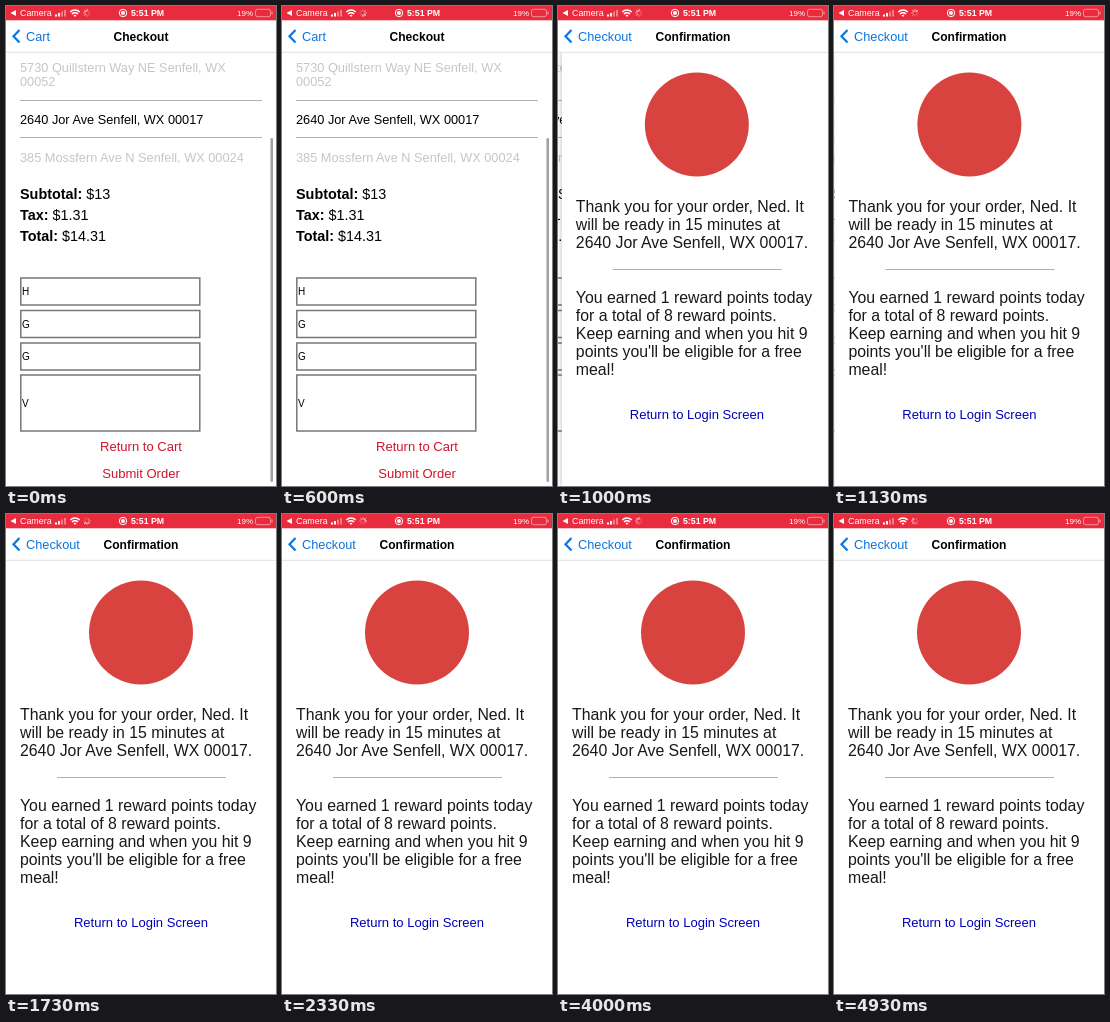
An HTML page for the animation above (4.99 s loop, 270x480 px).

```html
<!DOCTYPE html>
<html lang="en">
<head>
<meta charset="utf-8">
<title>Checkout</title>
<style>
  html, body { margin: 0; width: 100%; height: 100%; overflow: hidden; background: #fff; }
  svg { display: block; width: 100vw; height: 100vh; }
  text { font-family: "Liberation Sans", Arial, sans-serif; white-space: pre; }
  .status text { font-size: 8.9px; fill: #fff; }
  .status .clock { font-size: 8.75px; font-weight: bold; }
  .status .charge { font-size: 8px; }
  .back { font-size: 12.75px; fill: #0b74e0; }
  .title { font-size: 12.06px; font-weight: bold; text-anchor: middle; }
  .pick { font-size: 12.75px; }
  .faint { fill: #c6c6c6; }
  .sum { font-size: 14.4px; }
  .sum tspan { font-weight: bold; }
  .field { font-size: 10px; }
  .box { fill: #fff; stroke: #777; stroke-width: 1.5; }
  .rule { stroke: #b0b0b0; }
  .button { font-size: 13.05px; text-anchor: middle; }
  .body { font-size: 15.85px; fill: #181818; }
</style>
</head>
<body>
<svg viewBox="0 0 270 480">
  <defs>
    <filter id="blur" x="-20" width="41"><feGaussianBlur stdDeviation="2.5"/></filter>
  </defs>
  <rect width="270" height="480" fill="#fff"/>

  <g id="checkout">
    <text class="pick faint" x="14" y="66">5730 Quillstern Way NE Senfell, WX</text>
    <text class="pick faint" x="14" y="80.3">00052</text>
    <path class="rule" d="M14 94.5H256M14 131.5H256"/>
    <text class="pick" x="14" y="118">2640 Jor Ave Senfell, WX 00017</text>
    <text class="pick faint" x="14" y="155.5">385 Mossfern Ave N Senfell, WX 00024</text>
    <text class="sum" x="14" y="193"><tspan>Subtotal:</tspan> $13</text>
    <text class="sum" x="14" y="214"><tspan>Tax:</tspan> $1.31</text>
    <text class="sum" x="14" y="235"><tspan>Total:</tspan> $14.31</text>
    <g id="fields"></g>
    <text class="button" x="135" y="444.5" fill="#d0142c">Return to Cart</text>
    <text class="button" x="135" y="471.5" fill="#d0142c">Submit Order</text>
    <rect x="264.5" y="132" width="2.5" height="344" rx="1.2" fill="#a0a0a0"/>
  </g>

  <g id="confirmation">
    <rect y="46" width="6" height="434" fill="#000" opacity=".3" filter="url(#blur)"/>
    <rect y="46" width="270" height="434" fill="#fff"/>
    <circle cx="135" cy="118.500" r="52" fill="#d9433f"/>
    <g id="message"></g>
    <path class="rule" d="M51 263.500H220"/>
    <text class="button" x="135" y="413" fill="#0000b8">Return to Login Screen</text>
  </g>

  <rect width="270" height="46" fill="#fff"/>
  <path d="M0 46.300H270" stroke="#c9c9cc" stroke-width=".6"/>
  <path d="M13.500 24L7.500 30.200L13.500 36.400" fill="none" stroke="#0b74e0" stroke-width="2.200"/>
  <g id="oldHeader">
    <text class="back" x="20" y="34.500">Cart</text>
    <text class="title" x="135" y="34.500">Checkout</text>
  </g>
  <g id="newHeader">
    <text class="back" x="20" y="34.500">Checkout</text>
    <text class="title" x="135" y="34.500">Confirmation</text>
  </g>

  <g class="status">
    <rect width="270" height="14.300" fill="#e92c3d"/>
    <path d="M10 4V10L4.500 7Z" fill="#fff"/>
    <text x="14" y="10.200">Camera</text>
    <path d="M49 8.500h2v2h-2zM52 7h2v3.500h-2z" fill="#fff"/>
    <path d="M55 5.500h2v5h-2zM58 4h2v6.500h-2z" fill="#fff" opacity=".4"/>
    <g fill="none" stroke="#fff" stroke-width="1.500">
      <path d="M64.300 6A6.600 6.600 0 0 1 73.700 6M66 8A4.200 4.200 0 0 1 72 8"/>
      <circle cx="117" cy="7" r="3.700" stroke-width="1"/>
    </g>
    <path d="M67.500 9.300Q69 8.200 70.500 9.300L69 11Z" fill="#fff"/>
    <circle cx="117" cy="7" r="2" fill="#fff"/>
    <g id="spinner" stroke="#fff" stroke-width="1" stroke-linecap="round"></g>
    <text class="clock" x="125" y="10.200">5:51 PM</text>
    <text class="charge" x="231" y="10">19%</text>
    <rect x="249.500" y="3.300" width="15" height="7.400" rx="2" fill="none" stroke="#fff" stroke-width=".8" opacity=".6"/>
    <path d="M266 5.700v2.600" stroke="#fff" opacity=".6"/>
  </g>
</svg>

<script>
const LOOP = 4990, PUSH_START = 677, PUSH_TIME = 500, SPOKES = 8;
const byId = id => document.getElementById(id);

byId("fields").innerHTML = [["H", 272, 27], ["G", 304.5, 27], ["G", 337, 27], ["V", 369, 56]]
  .map(([label, y, h]) =>
    `<rect class="box" x="14.8" y="${y}" width="179" height="${h}"/>
     <text class="field" x="16" y="${y + h / 2 + 3.6}">${label}</text>`)
  .join("");

const paragraph = (top, lines) => lines
  .map((line, i) => `<text class="body" x="14" y="${top + i * 18.1}">${line}</text>`)
  .join("");
byId("message").innerHTML =
  paragraph(206, [
    "Thank you for your order, Ned. It",
    "will be ready in 15 minutes at",
    "2640 Jor Ave Senfell, WX 00017."
  ]) +
  paragraph(297, [
    "You earned 1 reward points today",
    "for a total of 8 reward points.",
    "Keep earning and when you hit 9",
    "points you'll be eligible for a free",
    "meal!"
  ]);

byId("spinner").innerHTML = Array.from({ length: SPOKES }, (_, i) =>
  `<path d="M81 5.2V3.6" transform="rotate(${i * 360 / SPOKES} 81 7)"/>`).join("");
const spokes = [...byId("spinner").children];

function bezierEase(x1, y1, x2, y2) {
  const curve = (a, b, s) => 3 * a * s * (1 - s) ** 2 + 3 * b * s * s * (1 - s) + s ** 3;
  return x => {
    let low = 0, high = 1;
    for (let i = 0; i < 24; i++) {
      const mid = (low + high) / 2;
      if (curve(x1, x2, mid) < x) low = mid; else high = mid;
    }
    return curve(y1, y2, low);
  };
}
const ease = bezierEase(0.2833, 0.99, 0.31833, 0.99);

function draw(t) {
  const linear = Math.min(1, Math.max(0, (t - PUSH_START) / PUSH_TIME));
  const push = linear === 0 || linear === 1 ? linear : ease(linear);
  byId("checkout").setAttribute("transform", `translate(${-81 * push})`);
  byId("confirmation").setAttribute("transform", `translate(${270 * (1 - push)})`);
  byId("confirmation").style.display = push ? "" : "none";
  byId("oldHeader").setAttribute("opacity", 1 - push);
  byId("newHeader").setAttribute("opacity", push);

  const lead = Math.floor(t / 1000 * SPOKES);
  spokes.forEach((spoke, i) => {
    const age = (lead - i + 8 * SPOKES) % SPOKES;
    spoke.setAttribute("opacity", Math.max(0.2, 0.95 - age * 0.15));
  });
}

const start = performance.now();
function tick() {
  draw((performance.now() - start) % LOOP);
  requestAnimationFrame(tick);
}
tick();
</script>
</body>
</html>
```
